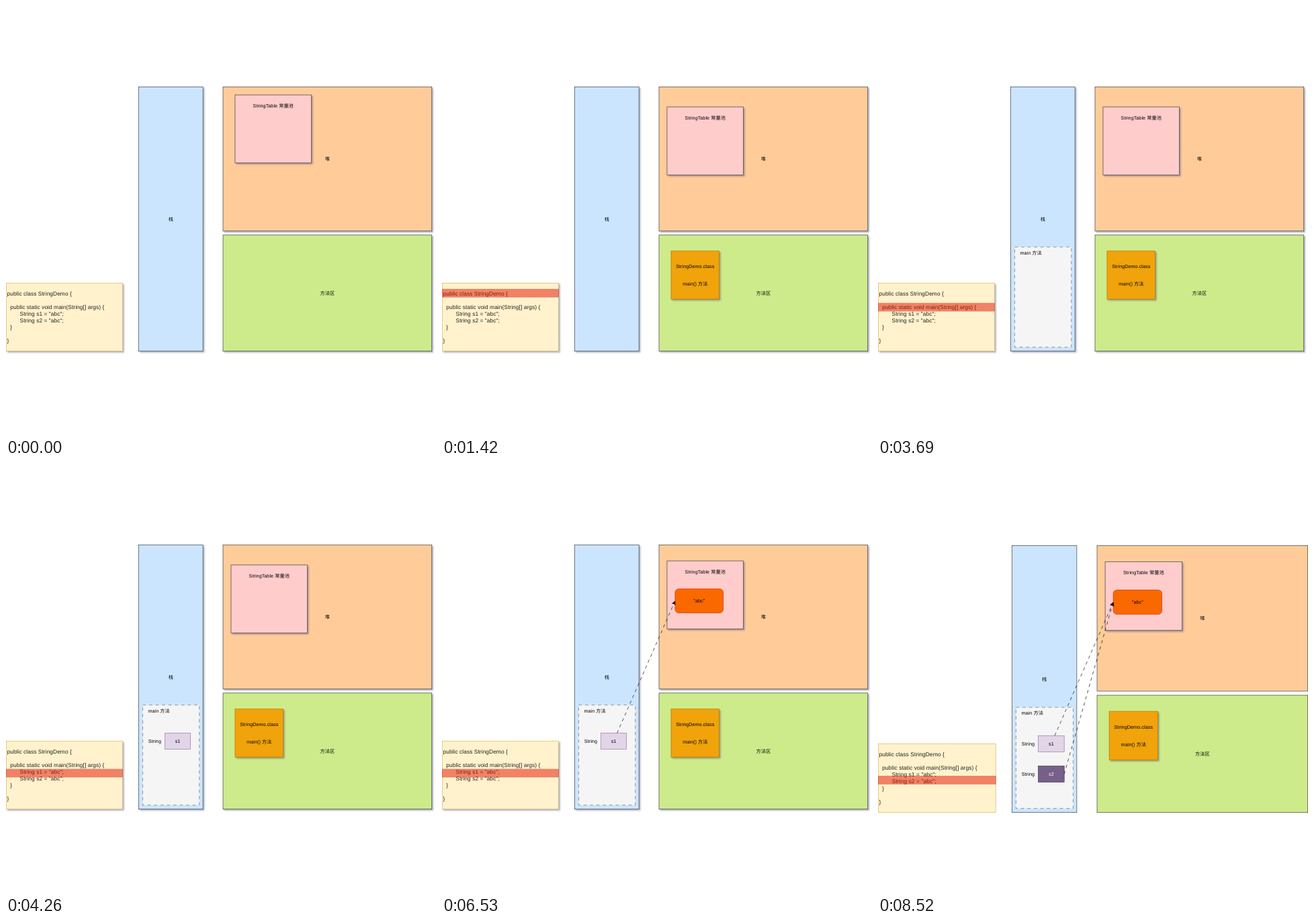
Write an HTML page that moves like this. It is 640 by 640 pixels and loops after 9.94 s.

```html
<!DOCTYPE html>
<html lang="zh-CN">
<head>
<meta charset="utf-8">
<title>String memory layout</title>
<style>
  html, body { margin: 0; width: 100%; height: 100%; overflow: hidden; background: #fff; }
  svg { display: block; width: 640px; height: 640px; }
  rect, path { stroke-width: 1.1px; }
  text {
    font-family: "Liberation Sans", Arial, "Noto Sans CJK SC", "Noto Sans CJK", sans-serif;
    white-space: pre; letter-spacing: .1px; text-rendering: geometricPrecision;
  }
  .shadow, .lifted .outer { filter: drop-shadow(3px 3px 1.7px rgba(61, 69, 116, .45)); }
  .dash { stroke-dasharray: 8px 8px; }
</style>
</head>
<body>
<svg viewBox="0 0 640 640"></svg>
<script>
const NS = "http://www.w3.org/2000/svg";
const STEP = 1420, STEPS = 7;
const INK = "#36393d";

function add(parent, tag, attrs = {}, content) {
  const el = document.createElementNS(NS, tag);
  for (const key in attrs) el.setAttribute(key, attrs[key]);
  if (content !== undefined) el.textContent = content;
  return parent.appendChild(el);
}

const group = () => add(scene, "g");

function box(parent, x, y, width, height, fill, stroke, extra) {
  return add(parent, "rect", { x, y, width, height, fill, stroke, ...extra });
}

// x is the middle of the label, y the middle of its line
function label(parent, x, y, content, fill = "#000") {
  add(parent, "text", { x, y: y + 4.2, "font-size": 12, "text-anchor": "middle", fill }, content);
}

function arrow(parent, x1, y1, x2, y2) {
  const angle = Math.atan2(y2 - y1, x2 - x1);
  const back = 7 / Math.hypot(x2 - x1, y2 - y1);
  const ex = x2 - (x2 - x1) * back, ey = y2 - (y2 - y1) * back;
  add(parent, "path", { d: `M${x1} ${y1}L${ex} ${ey}`, fill: "none", stroke: "#000", class: "dash" });
  add(parent, "path", {
    d: "M-1 0L-9 -4L-7 0L-9 4Z", fill: "#000", stroke: "#000",
    transform: `translate(${x2} ${y2}) rotate(${angle * 180 / Math.PI})`
  });
}

const scene = add(document.querySelector("svg"), "g");
const outer = { class: "outer" }, shadow = { class: "shadow" };

// memory areas
const areas = group();
box(areas, 330, 0, 160, 660, "#cce5ff", INK, outer);
label(areas, 410, 330, "栈");
box(areas, 540, 0, 520, 360, "#ffcc99", INK, outer);
label(areas, 800, 180, "堆");
box(areas, 540, 370, 520, 290, "#cdeb8b", INK, outer);
label(areas, 800, 515, "方法区");

// code note
box(areas, 0, 490, 290, 170, "#fff2cc", "#d6b656", outer);
[
  "public class StringDemo {",
  "",
  "  public static void main(String[] args) {",
  '        String s1 = "abc";',
  '        String s2 = "abc";',
  "  }",
  "",
  "}"
].forEach((line, i) => add(areas, "text",
  { x: 2, y: 516 + 16.8 * i + 4.9, "font-size": 14, fill: "#222" }, line));
const marker = box(scene, 0, 505, 290, 20, "#e51400", "#b20000", { opacity: .5 });

// constant pool, drawn from its own corner
const pool = group();
box(pool, 0, 0, 190, 170, "#ffcccc", INK, shadow);
label(pool, 95, 27, "StringTable 常量池");

const classInfo = group();
box(classInfo, 570, 410, 120, 120, "#f0a30a", "#bd7000", shadow);
label(classInfo, 630, 448.4, "StringDemo.class");
label(classInfo, 630, 491.6, "main() 方法");

const callFrame = group();
box(callFrame, 340, 400, 141, 250, "#f5f5f5", "#666", { class: "dash" });
label(callFrame, 380.5, 414.5, "main 方法");

function variable(name, y, fill, stroke, color) {
  const g = group();
  label(g, 370, y + 20, "String");
  box(g, 395, y, 64, 40, fill, stroke);
  label(g, 427, y + 20, name, color);
  return g;
}
const first = variable("s1", 470, "#e1d5e7", "#9673a6");
const second = variable("s2", 545, "#76608a", "#432d57", "#fff");

const literal = group();
box(literal, 580, 110, 120, 60, "#fa6800", "#c73500", { rx: 9 });
label(literal, 640, 140, '"abc"');
arrow(literal, 435.5, 470, 580, 140);

const secondLink = group();
arrow(secondLink, 459, 565, 580, 140);

// each part with the step at which it appears
const entries = [[marker, 1], [classInfo, 1], [callFrame, 2], [first, 3],
  [literal, 4], [second, 5], [secondLink, 6]];
const markerY = [505, 505, 540, 560, 560, 570, 570];
let shown = -1;

function draw(time) {
  const step = Math.floor(time / STEP) % STEPS;
  if (step === shown) return;
  shown = step;
  const wide = step >= 5;
  scene.setAttribute("transform", wide
    ? "translate(.3 121.3) scale(.6032 .6021)"
    : "translate(.3 120.3) scale(.5976 .5961)");
  scene.setAttribute("class", wide ? "" : "lifted");
  for (const [el, from] of entries) el.style.display = step >= from ? "" : "none";
  marker.setAttribute("y", markerY[step]);
  const [px, py] = step === 0 ? [570, 20] : [560, step < 4 ? 50 : 40];
  pool.setAttribute("transform", `translate(${px} ${py})`);
}

const start = performance.now();
function tick() {
  draw(performance.now() - start);
  requestAnimationFrame(tick);
}
tick();
</script>
</body>
</html>
```
